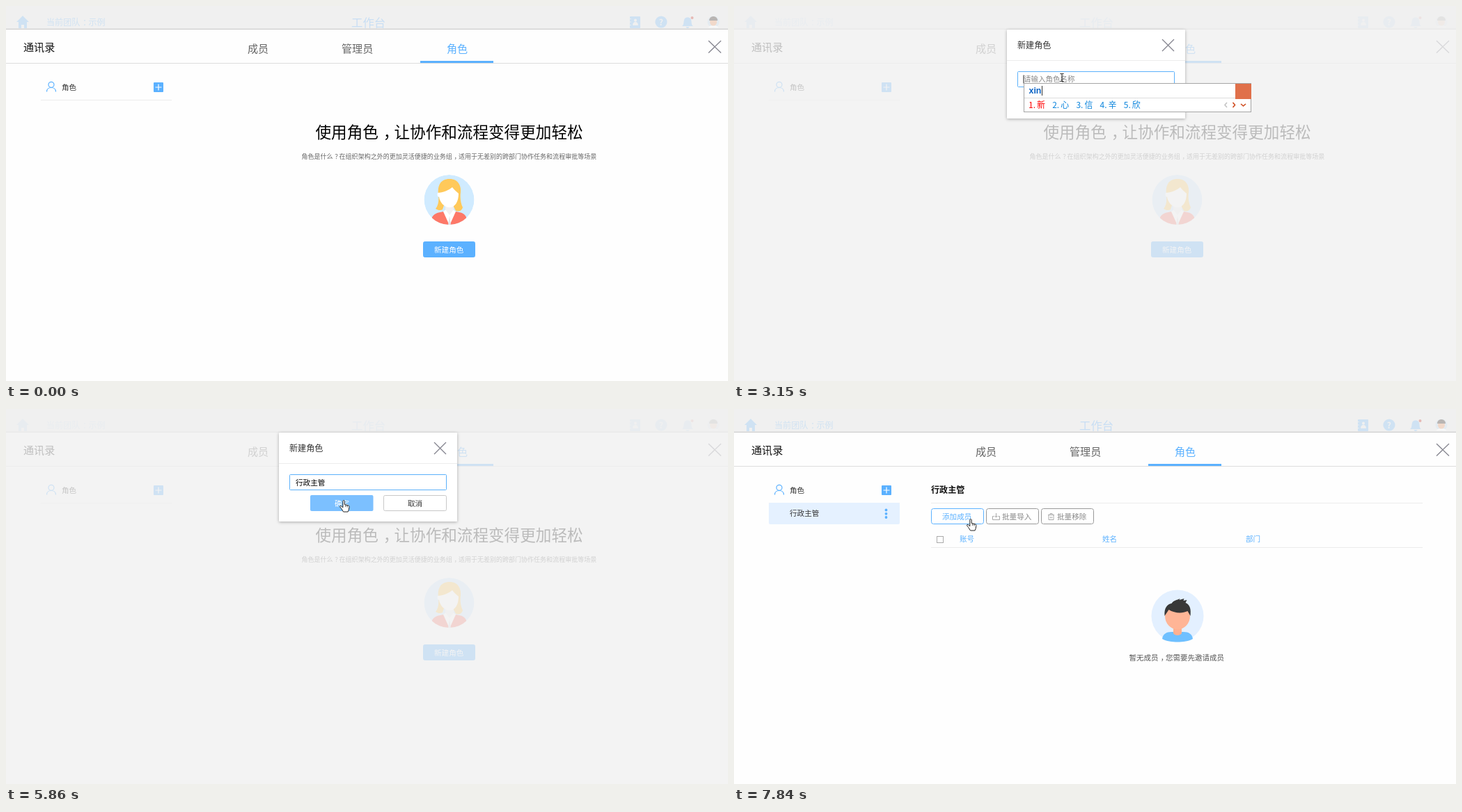
An HTML page for the animation above (8000 ms loop, 1037 by 540 pixels).

```html
<!DOCTYPE html>
<html lang="zh-CN">
<head>
<meta charset="utf-8">
<title>新建角色</title>
<style>
  html, body { margin: 0; width: 100%; height: 100%; overflow: hidden; background: #fefefe; }
  svg { display: block; width: 1037px; height: 540px; }
  text { font: 10.6px "Noto Sans CJK SC", "Noto Sans CJK", "Noto Sans", sans-serif; fill: #333; white-space: pre; }
  .tab { font-size: 15.1px; fill: #666; }
  .t12 { font-size: 12.1px; }
  .blue { fill: #5bb1ff; }
  .white { fill: #fff; }
  .grey { fill: #888; }
  .line { stroke: #ececec; fill: none; }
  .pale { fill: #cfe2f3; }
  .x { fill: none; stroke: #85858f; stroke-width: 1.3; }
  .btn { fill: #fff; stroke: #999; }
  #modal .box { filter: drop-shadow(0 1px 2px rgba(0, 0, 0, .3)); }
  #pinyin { font: bold 12.4px "Liberation Sans", Arial, sans-serif; fill: #0a62c4; }
  #cands text { font-size: 12px; fill: #0b84dc; }
  #cands .first { fill: #f00; }
</style>
</head>
<body>
<svg viewBox="0 0 1037 540" xmlns="http://www.w3.org/2000/svg">
  <defs>
    <clipPath id="disc"><circle cx="636.5" cy="279" r="36"/></clipPath>
  </defs>
  <rect width="1037" height="540" fill="#fefefe"/>

  <!-- top bar -->
  <rect width="1037" height="34" fill="#f0f0f0"/>
  <path class="pale" d="M24 14l9 9h-3v9h-4v-5h-4v5h-4v-9h-3z"/>
  <text class="t12" x="58" y="27.5" style="fill:#d0e2f2">当前团队：示例</text>
  <text x="496" y="30" style="font-size:16.4px;fill:#c8def4">工作台</text>
  <rect class="pale" x="896" y="15" width="15" height="17" rx="1"/>
  <path d="M900.5 27.5c0-6 7-6 7 0zM895 18.5h3M895 23h3M895 27.5h3" fill="#f0f0f0" stroke="#f0f0f0" stroke-width=".8"/>
  <circle cx="904" cy="20.5" r="2" fill="#f0f0f0"/>
  <circle class="pale" cx="941" cy="23" r="8.6"/>
  <text x="937.7" y="27.5" style="font-size:12px;font-weight:bold;fill:#f0f0f0">?</text>
  <path class="pale" d="M971 29c3-2 2-6 3-9 1-5 9-5 10 0 1 3 0 7 3 9zM976.5 30h5c-1 2.5-4 2.5-5 0z"/>
  <circle cx="985.5" cy="17" r="2" fill="#e6b9b5"/>
  <circle cx="1016" cy="23" r="8.5" fill="#e4ebf1"/>
  <path d="M1008.5 31c2-4 13-4 15 0z" fill="#f8f8f8"/>
  <ellipse cx="1016" cy="23" rx="5" ry="5.5" fill="#f1d9ca"/>
  <path d="M1010 21c0-8 12-8 12 0z" fill="#b9b5b3"/>
  <path d="M0 32.5h1037" stroke="#e6e6e6"/>
  <path d="M0 33.5h1037" stroke="#d0d0d0"/>

  <!-- tabs -->
  <text x="25" y="65" style="font-size:15.1px;fill:#111">通讯录</text>
  <text class="tab" x="347" y="66.5">成员</text>
  <text class="tab" x="482" y="66.5">管理员</text>
  <text class="tab" x="633" y="66.5" style="fill:#5bb1ff">角色</text>
  <rect class="blue" x="595" y="79" width="105" height="3"/>
  <path d="M0 82.5h1037" stroke="#dedede"/>
  <path class="x" d="M1009 50l18 17.5M1027 50l-18 17.5"/>

  <!-- sidebar -->
  <g fill="none" stroke="#5bb1ff" stroke-width="1.2">
    <circle cx="65" cy="113.3" r="4"/>
    <path d="M58.5 123.5c0-8 13-8 13 0"/>
  </g>
  <text x="80" y="121">角色</text>
  <rect class="blue" x="212" y="110" width="14" height="14" rx="1"/>
  <path d="M214.5 117h9M219 112.5v9" stroke="#fff" stroke-width="1.2"/>
  <path class="line" d="M50 135.5h188"/>

  <!-- introduction -->
  <g id="intro">
    <text x="444.5" y="190" style="font-size:22.6px;font-weight:350;fill:#000">使用角色，让协作和流程变得更加轻松</text>
    <text x="424.5" y="220.3" style="font-size:9.02px;fill:#666">角色是什么？在组织架构之外的更加灵活便捷的业务组，适用于无差别的跨部门协作任务和流程审批等场景</text>
    <g clip-path="url(#disc)">
      <circle cx="636.5" cy="279" r="36" fill="#d0ebff"/>
      <path d="M621 272c-2-16 5-23 16-23s17 8 16 19c-1 8 0 16 3 22-2 6-6 6-10 5l-4-8h-13l-2 6c-3 2-7 1-10-1 4-5 5-12 4-20z" fill="#ffc95a"/>
      <path d="M612 304c4-7 12-7 17-8h16c6 1 13 1 16 8v14h-49z" fill="#fd7868"/>
      <path d="M628 296l9 20 9-20-4-3h-10z" fill="#fff"/>
      <path d="M631 285h12v8l-6 8-6-8z" fill="#f3f1f1"/>
      <path d="M637 302l-2 13h4z" fill="#e3e3e8"/>
      <path d="M620 269c8 0 16-4 21-8 3 4 6 6 9 9 0 12-5 20-13 20s-14-8-15-15c-2 0-3-3-2-6z" fill="#fff"/>
    </g>
    <rect id="create" x="599.5" y="339.5" width="74" height="22" rx="2"/>
    <text class="white" x="615" y="355">新建角色</text>
  </g>

  <!-- role page -->
  <g id="role">
    <rect x="50" y="135" width="188" height="31" rx="2" fill="#e5f1ff"/>
    <text x="80" y="154.3">行政主管</text>
    <g class="blue"><circle cx="218.5" cy="145.5" r="1.9"/><circle cx="218.5" cy="150.8" r="1.9"/><circle cx="218.5" cy="156" r="1.9"/></g>
    <text class="t12" x="283" y="121" style="font-weight:bold;fill:#111">行政主管</text>
    <path class="line" d="M283 135.5h706M283 199.5h706"/>
    <rect class="btn" x="283.5" y="143.5" width="75" height="22" rx="3" style="stroke:#5bb1ff"/>
    <rect class="btn" x="362.5" y="143.5" width="75" height="22" rx="3"/>
    <rect class="btn" x="441.5" y="143.5" width="75" height="22" rx="3"/>
    <text class="blue" x="299" y="158.5">添加成员</text>
    <text class="grey" x="385" y="158.5">批量导入</text>
    <text class="grey" x="464" y="158.5">批量移除</text>
    <path d="M373.5 154.5h-2v5h10v-5h-2M376.5 150v6m-2-2l2 2 2-2M451 152.5h9M454 152v-1.5h3v1.5M452 153v6.5h7v-6.5M454.5 155v2.5M456.5 155v2.5" fill="none" stroke="#a0a0a0" stroke-width=".9"/>
    <rect x="291.5" y="183.5" width="9" height="9" fill="#fff" stroke="#aaa"/>
    <text class="blue" x="324" y="190.5">账号</text>
    <text class="blue" x="529" y="190.5">姓名</text>
    <text class="blue" x="735" y="190.5">部门</text>
    <circle cx="637" cy="298" r="37.5" fill="#e3f0ff"/>
    <path d="M615 331c1-7 6-10 13-10h18c7 0 12 3 13 10-6 3.500-14 4.500-22 4.500s-16-1-22-4.500z" fill="#6fc0ff"/>
    <path d="M631 312h12v10c0 5-12 5-12 0z" fill="#ffb08f"/>
    <ellipse cx="637" cy="298" rx="18" ry="19.5" fill="#ffb596"/>
    <path d="M618.5 298c-1-12 4-17 10-18 2-4 8-5 12-7l-1 2 7-2-1 3 5-1-2 4c7 3 8 10 7 19l-4-7c-8 4-19 3-27-2z" fill="#383838"/>
    <text x="567.5" y="361.8" style="fill:#555;font-size:10.5px">暂无成员，您需要先邀请成员</text>
  </g>

  <rect id="veil" width="1037" height="540" fill="#f0f0f0"/>

  <g id="modal">
    <rect class="box" x="392" y="34" width="256" height="128" rx="1" fill="#fff"/>
    <text class="t12" x="407" y="61">新建角色</text>
    <path class="x" d="M615 48l17 17M632 48l-17 17"/>
    <path class="line" d="M392 78.5h256"/>
    <rect id="field" x="407.5" y="94.5" width="225" height="22" rx="1" fill="#fff"/>
    <text id="hint" x="416" y="109" style="fill:#8a8a8a;font-size:10.5px">请输入角色名称</text>
    <text id="value" x="416" y="109.5" style="fill:#000">行政主管</text>
    <rect id="caret" y="99.5" width="1" height="12" fill="#222"/>
    <rect id="ok" x="437" y="124" width="90.5" height="23" rx="2"/>
    <text class="white" x="472" y="139.8">确定</text>
    <rect class="btn" x="542.5" y="124.5" width="90" height="22" rx="2" style="stroke:#c8c8c8"/>
    <text x="577" y="139.8">取消</text>
  </g>

  <!-- input method window -->
  <g id="ime">
    <rect x="416.5" y="111.5" width="326" height="41" fill="#fff" stroke="#a5a5a5"/>
    <path d="M417 132.5h303" stroke="#dcdcdc"/>
    <text id="pinyin" x="423.5" y="126.3"></text>
    <rect id="bar" y="115" width="1" height="14" fill="#333"/>
    <g id="cands"></g>
    <g fill="none" stroke-width="1.6">
      <path d="M708 139l-3 3.500 3 3.500" stroke="#c4c4c4"/>
      <path d="M716.5 139l3 3.500-3 3.500M728 141l3.500 3 3.500-3" stroke="#cf4a1d"/>
    </g>
    <rect x="720" y="112" width="23" height="22" fill="#e0704a"/>
  </g>

  <circle id="press" r="9" fill="#ec7055" opacity=".75"/>
  <g id="arrow"><path d="M0 0v13.500l3-2.800 2.200 5 2.300-1-2.200-4.800h4.200z" fill="#fff" stroke="#222" stroke-width=".9"/></g>
  <g id="beam"><path d="M-2.500-5.500h2l.5.500.5-.500h2M0-5v10M-2.500 5.500h2l.5-.500.5.500h2" fill="none" stroke="#111"/></g>
  <g id="hand"><path d="M-1.200 1c0-2 2.400-2 2.400 0v4.500l5 1.200c1.600.4 1.800 1.300 1.600 3l-.8 4-1 2.300h-6.500l-2.800-4.500-2-2.500c-.8-1.400.8-2.200 1.900-1.200l2.200 2z" fill="#fff" stroke="#222"/><path d="M2.800 6v3M5.200 6.600v2.800" stroke="#222" stroke-width=".8"/></g>
</svg>
<script>
const LOOP = 8000, STEP = 79.4, PHASE = 57;
const BLUE = "#5bb1ff", LIGHT = "#7cc0ff";
const ui = {};
document.querySelectorAll("svg [id]").forEach(e => ui[e.id] = e);

// full-width punctuation sits in the middle of its cell
document.querySelectorAll("text").forEach(e => {
  if (/[，？：]/.test(e.textContent)) e.innerHTML = e.textContent.replace(/([，？：])(.)/g,
    '<tspan dx=".3em">$1</tspan><tspan dx="-.3em">$2</tspan>');
});

const ramp = (t, a, b) => Math.min(1, Math.max(0, (t - a) / (b - a)));
const easeOut = x => 1 - Math.pow(1 - x, 1.7);
const smooth = x => x * x * (3 - 2 * x);
const within = (t, a, b) => t >= a && t < b;
const show = (el, on) => el.setAttribute("visibility", on ? "visible" : "hidden");

// time, x, y of the pointer's hot spot
const path = [
  [280, 650, 506], [770, 631, 346], [1170, 631, 346], [1625, 471, 103],
  [5500, 471, 103], [5950, 487, 136], [6930, 487, 136], [7640, 340, 159]
];
const clicks = [[840, 990], [1780, 1940], [6070, 6230], [7660, 7820]];

// time, typed letters, candidates
const typing = [
  [2810, "x", "想 下 学 小 新"],
  [2890, "xi", "系 西 洗 习 细"],
  [2970, "xin", "新 心 信 辛 欣"],
  [3130, "xing", "行 性 型 星 兴"],
  [3210, "xing'z", "性质 行走 行政 性子 星座"],
  [3450, "xing'zh", "性质 形状 行政 症状 行章"],
  [3530, "xing'zhe", "行者 性者 刑者 醒着 姓者"],
  [3690, "xing'zhen", "行阵 刑侦 星震 行真 性真"],
  [3770, "xing'zheng", "行政 性征 行正 形正 兴政"],
  [3930, "xing'zheng'z", "行政章 行政组 行政长 性症状 行政"],
  [4010, "xing'zheng'zh", "行政章 性症状 性政治 行政组 行政"],
  [4250, "xing'zheng'zhu", "行政主 行政助 行政组 行政住 行政"],
  [4330, "xing'zheng'zhu'g", "行政主管 行政主观 行政主 行政"],
  [4410, "xing'zheng'zhu'gu", "行政主顾 行政主管 行政主 行政"],
  [4490, "xing'zheng'zhu'gua", "行政主管 行政主挂 行政主 行政"],
  [4570, "xing'zheng'zhu'guan", "行政主管 行政主观 行政主 行政"]
];
const COMMIT = 4730;

function pointer(t) {
  let i = 0;
  while (i < path.length - 2 && t >= path[i + 1][0]) i++;
  const [a, x, y] = path[i], [b, u, v] = path[i + 1];
  const k = smooth(ramp(t, a, b));
  return [x + (u - x) * k, y + (v - y) * k];
}

function label(x, s, cls) {
  return `<text x="${x}" y="146.5" class="${cls}">${s}</text>`;
}

let shown = "";
function drawIme(t) {
  const on = within(t, typing[0][0], COMMIT);
  show(ui.ime, on);
  if (!on) return;
  const [, letters, words] = typing.filter(r => r[0] <= t).pop();
  if (letters === shown) return;
  shown = letters;
  ui.pinyin.textContent = letters;
  ui.bar.setAttribute("x", Math.round(424 + ui.pinyin.getComputedTextLength()));
  let x = 423, out = "";
  words.split(" ").forEach((w, i) => {
    const cls = i ? "" : "first";
    out += label(x, i + 1 + ".", cls) + label(x + 12, w, cls);
    x += 22.2 + 12 * w.length;
  });
  ui.cands.innerHTML = out;
}

function drawModal(t) {
  const closing = t > 6300;
  const alpha = closing ? 1 - ramp(t, 6360, 6510) : ramp(t, 990, 1140);
  const lift = closing ? easeOut(ramp(t, 6365, 6665)) : 1 - easeOut(ramp(t, 950, 1250));
  ui.modal.setAttribute("opacity", alpha);
  ui.modal.setAttribute("transform", `translate(0 ${-32 * lift})`);
  ui.veil.setAttribute("opacity", .78 * alpha);

  const done = t >= COMMIT;
  show(ui.hint, !done);
  show(ui.value, done);
  const focus = t > 6060 ? 0 : ramp(t, 1700, 2000);
  const mix = (a, b) => Math.round(a + (b - a) * focus);
  ui.field.setAttribute("stroke", `rgb(${mix(221, 91)},${mix(221, 177)},${mix(221, 250)})`);
  const lit = within(t, 1780, 2330) || within(t, 2810, 5360) || within(t, 5900, 6060);
  show(ui.caret, lit);
  ui.caret.setAttribute("x", done ? 458 : 415.5);
}

function drawPointer(t) {
  const [x, y] = pointer(t);
  let kind = "arrow";
  if (within(t, 1300, 5960) && y < 117) kind = "beam";
  else if (within(t, 5500, 6480) && y > 123) kind = "hand";
  else if (t > 6930 && x < 358) kind = "hand";
  for (const k of ["arrow", "beam", "hand"]) {
    show(ui[k], k === kind && t >= 280);
    ui[k].setAttribute("transform", `translate(${x} ${y})`);
  }
  show(ui.press, clicks.some(c => within(t, ...c)));
  ui.press.setAttribute("cx", x - .5);
  ui.press.setAttribute("cy", y);

  const hover = t >= 280 && within(x, 599, 674) && within(y, 339, 362);
  ui.create.setAttribute("fill", hover ? LIGHT : BLUE);
  ui.create.setAttribute("stroke", !hover ? BLUE : t > 840 ? "#64a6de" : LIGHT);
  ui.ok.setAttribute("fill", within(t, 5500, 6600) && y > 123 ? LIGHT : BLUE);
}

function draw(time) {
  const t = Math.max(0, Math.floor((time - PHASE) / STEP) * STEP + PHASE);
  const created = t >= 6620;
  show(ui.intro, !created);
  show(ui.role, created);
  drawModal(t);
  drawIme(t);
  drawPointer(t);
}

const start = performance.now();
function tick() {
  draw((performance.now() - start) % LOOP);
  requestAnimationFrame(tick);
}
tick();
</script>
</body>
</html>
```
